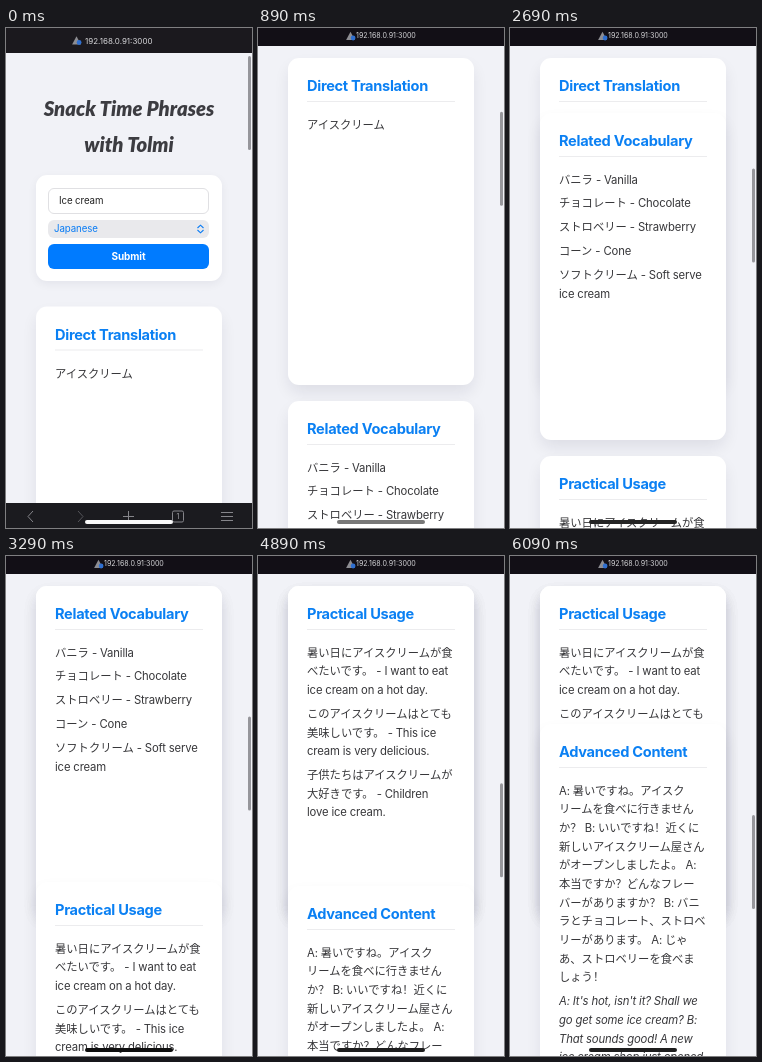
Animation, 246 px wide and 500 px high, one loop 6290 ms. Source, as an HTML page:

```html
<!DOCTYPE html>
<html lang="ja">
<head>
<meta charset="utf-8">
<title>Phrase cards</title>
<style>
  html, body { margin: 0; width: 100%; height: 100%; overflow: hidden; background: #f1f2f7; }
  #stage { position: relative; width: 246px; height: 500px; overflow: hidden; background: #f1f2f7;
    font: 11.3px/18.7px Inter, "Noto Sans CJK JP", "Noto Sans CJK", sans-serif; color: #37373a; }
  #stage > *, #top > *, #intro > * { position: absolute; box-sizing: border-box; white-space: nowrap; }
  #intro { left: 0; top: 0; width: 246px; height: 270px; }
  h1 { left: 0; top: 62px; width: 246px; margin: 0; text-align: center; color: #3c3c41;
    font: italic 900 20.3px/36px Lato, cursive; }
  .panel, .card { left: 30px; width: 186px; background: #fff; border-radius: 11px; }
  .panel { top: 147px; height: 106px; box-shadow: 0 3px 10px rgba(20, 20, 50, .06); }
  .field { left: 42px; width: 161px; border-radius: 6px; font-size: 9.7px; letter-spacing: -.1px; }
  .input { top: 160px; height: 26px; padding-left: 10px; border: 1px solid #e0e0e3; line-height: 24px; color: #222; }
  .select { top: 192px; height: 18px; padding-left: 6px; background: #e9e9ec; line-height: 18px; color: #0a7cf4; }
  .submit { top: 216px; height: 25px; background: #007bff; color: #fff; text-align: center;
    font-weight: 700; font-size: 10px; line-height: 25px; }
  .select svg { position: absolute; right: 4px; top: 4px; }
  .card { top: 0; height: 327px; padding: 18px 19px 0; overflow: hidden;
    box-shadow: 0 8px 16px -1px rgba(20, 20, 50, .09); }
  .card.tall { height: 520px; }
  h2 { margin: 0 0 13.6px; padding-bottom: 5px; border-bottom: 1px solid #ececee; color: #0b80f3;
    font-size: 14.6px; font-weight: 700; line-height: 20px; letter-spacing: -.3px; }
  .item { margin-bottom: 5.2px; letter-spacing: -.15px; }
  .item div { height: 18.7px; }
  .item span { font-family: "Noto Sans CJK JP", "Noto Sans CJK", sans-serif; letter-spacing: 0; line-height: 0; }
  .item span[lang] { font-family: "Noto Sans CJK SC", "Noto Sans CJK", sans-serif; }
  .item.it { font-style: italic; }
  #bar { left: 242px; top: 0; width: 3px; height: 94px; border-radius: 2px; background: #96969b; }
  #top { left: 0; top: 0; width: 246px; overflow: hidden; }
  #addr { left: 0; top: 0; line-height: 10px; color: #d6d6d9; letter-spacing: 0; }
  #mark { left: 0; top: 0; }
  #nav { left: 0; top: 475px; width: 246px; height: 25px; background: #1b1b1f; }
  #home { left: 79px; top: 492px; width: 88px; height: 3.5px; border-radius: 2px; }
</style>
</head>
<body>
<div id="stage">
  <div id="intro">
    <h1>Snack Time Phrases<br>with Tolmi</h1>
    <div class="panel"></div>
    <div class="field input">Ice cream</div>
    <div class="field select">Japanese
      <svg width="9" height="10" fill="none" stroke="#0a7cf4" stroke-width="1.1"><path d="M1.5 4 4.5 1.2 7.5 4M1.5 6 4.5 8.8 7.5 6"/></svg>
    </div>
    <div class="field submit">Submit</div>
  </div>
  <div id="bar"></div>
  <div id="top">
    <svg id="mark" width="11" height="10">
      <path d="M5 .8 9.4 9H.6Z" fill="#8d8d92"/><circle cx="7.6" cy="7" r="2.4" fill="#2f6fd0"/>
    </svg>
    <div id="addr">192.168.0.91:3000</div>
  </div>
  <svg id="nav" width="246" height="25" fill="none" stroke="#85858a">
    <path d="M27 8 22 13.5 27 19"/>
    <path d="M72 8 77 13.5 72 19" stroke="#55555a"/>
    <path d="M117 13.5H128M122.5 8V19M215 9.5H227M215 13.5H227M215 17.5H227"/>
    <rect x="166.5" y="8" width="11" height="11" rx="1.5"/>
    <text x="172" y="16.2" text-anchor="middle" font-family="Inter, sans-serif" font-size="7" fill="#a5a5aa" stroke="none">1</text>
  </svg>
  <div id="home"></div>
</div>
<script>
const $ = id => document.getElementById(id);

// One string per item; "|" breaks a line, a leading "~" means italic.
const cards = [
  ["Direct Translation", "アイスクリーム"],
  ["Related Vocabulary", "バニラ - Vanilla", "チョコレート - Chocolate", "ストロベリー - Strawberry",
    "コーン - Cone", "ソフトクリーム - Soft serve|ice cream"],
  ["Practical Usage",
    "暑い日にアイスクリームが食|べたいです。 - I want to eat|ice cream on a hot day.",
    "このアイスクリームはとても|美味しいです。 - This ice|cream is very delicious.",
    "子供たちはアイスクリームが|大好きです。 - Children|love ice cream."],
  ["Advanced Content",
    "A: 暑いですね。アイスク|リームを食べに行きません|か？ B: いいですね！近くに|新しいアイスクリーム屋さん|" +
    "がオープンしましたよ。 A:|本当ですか？どんなフレー|バーがありますか？ B: バニ|ラとチョコレート、ストロベ|" +
    "リーがあります。 A: じゃ|あ、ストロベリーを食べま|しょう！",
    "~A: It's hot, isn't it? Shall we|go get some ice cream? B:|That sounds good! A new|ice cream shop just opened"]
];

// Full-width "？" and "！" sit at the left of their cell, as in Chinese type.
const line = s => "<div>" + s
  .replace(/[\u3000-\u9fff]+/g, "<span>$&</span>")
  .replace(/[？！]/g, '<span lang="zh-CN">$&</span>') + "</div>";
const item = s => `<div class="item${s[0] === "~" ? " it" : ""}">` +
  s.replace("~", "").split("|").map(line).join("") + "</div>";

const cardEls = cards.map(([title, ...items], i) => {
  const el = document.createElement("section");
  el.className = i === cards.length - 1 ? "card tall" : "card";
  el.innerHTML = `<h2>${title}</h2>` + items.map(item).join("");
  $("stage").insertBefore(el, $("bar"));
  return el;
});

const LOOP = 6290, FIRST_TOP = 278.5, PITCH = 343, STUCK_TOP = 30;
const scrollKeys = [[0, 0], [100, 12], [490, 142], [890, 248.5], [1890, 400.5], [3290, 638.5],
  [4090, 798.5], [4890, 977.5], [6090, 1139.5]];
const homeKeys = [[0, 250], [100, 250], [890, 120], [1890, 65], [3290, 15], [4090, 0], [4890, 30], [6090, 30]];

const mix = (a, b, k) => a + (b - a) * k;
function valueAt(keys, t) {
  const i = keys.findIndex(k => k[0] > t);
  if (i < 0) return keys[keys.length - 1][1];
  const [t0, a] = keys[i - 1], [t1, b] = keys[i];
  return mix(a, b, (t - t0) / (t1 - t0));
}

// The picture holds between steps of 200 ms.
const stepTime = t => t < 100 ? 0 : t < 290 ? 100 : 290 + 200 * Math.floor((t - 290) / 200);
const move = (el, x, y) => el.style.transform = `translate(${x}px, ${y}px)`;

function draw(t) {
  const scroll = valueAt(scrollKeys, t);
  const fold = Math.min(1, scroll / 85);
  const grey = Math.round(valueAt(homeKeys, t));

  move($("intro"), 0, -scroll);
  cardEls.forEach((el, i) => move(el, 0, Math.max(STUCK_TOP, FIRST_TOP + PITCH * i - scroll)));
  move($("bar"), 0, 28 + 7 * fold + .1966 * scroll);

  $("top").style.height = mix(25, 18, fold) + "px";
  $("top").style.background = `rgb(${mix(27, 18, fold)}, ${mix(25, 15, fold)}, ${mix(30, 22, fold)})`;
  $("addr").style.fontSize = mix(8, 7.1, fold) + "px";
  move($("addr"), mix(79, 98, fold), mix(7.5, 3, fold));
  move($("mark"), mix(65.5, 87.5, fold), mix(7.5, 3, fold));
  move($("nav"), 0, 25 * fold);
  $("home").style.background = `rgb(${grey}, ${grey}, ${grey})`;
}

const start = performance.now();
function tick() {
  draw(stepTime((performance.now() - start) % LOOP));
  requestAnimationFrame(tick);
}
tick();
</script>
</body>
</html>
```
